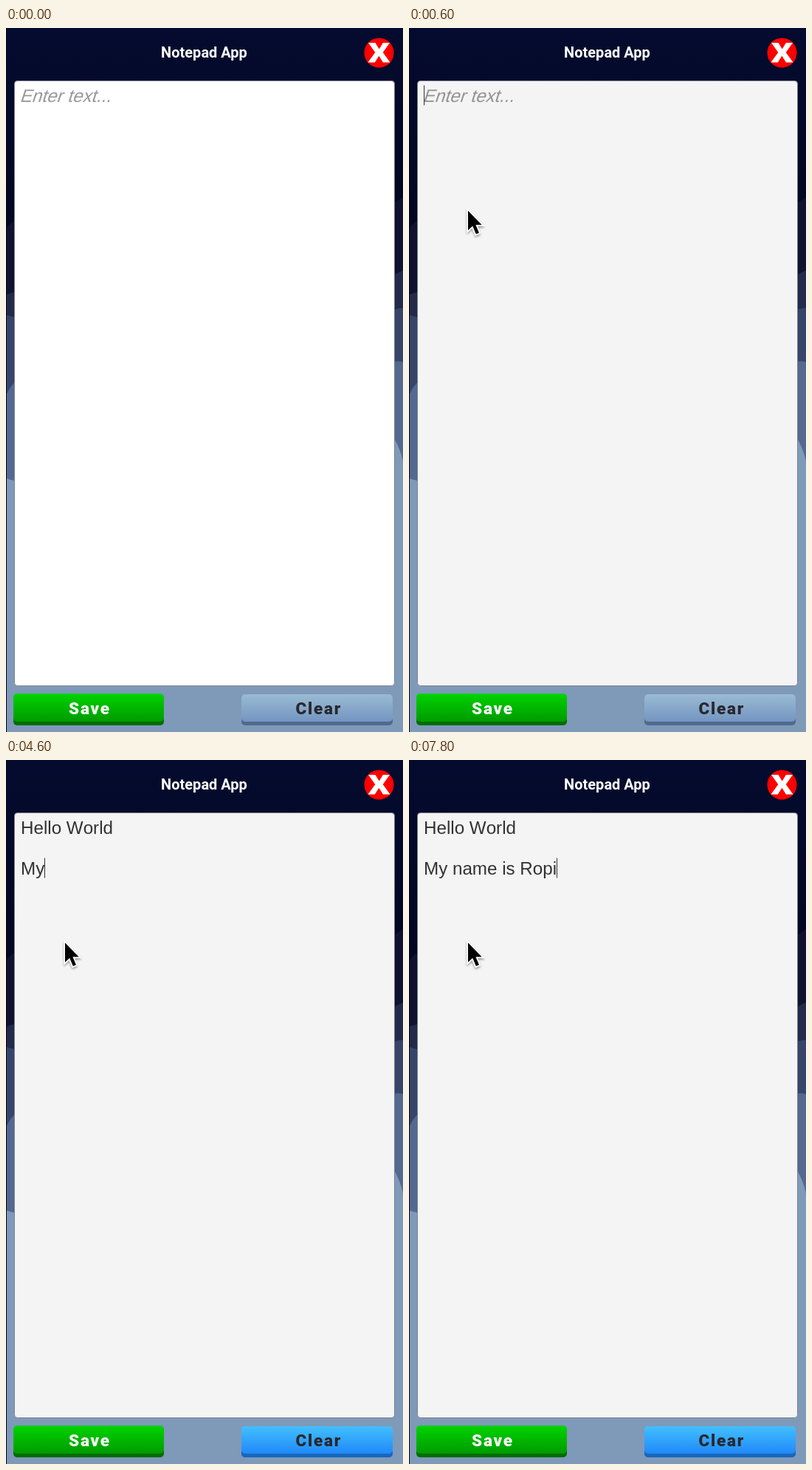
Write an HTML page that moves like this. It is 538 px wide and 952 px high and loops after 8 s.

```html
<!DOCTYPE html>
<html lang="en">
<head>
<meta charset="utf-8">
<title>Notepad App</title>
<style>
  html, body { margin: 0; width: 100%; height: 100%; overflow: hidden; background: #040a2c; }
  svg { display: block; width: 538px; height: 952px; }
  .title { font: 700 20px Roboto, sans-serif; fill: #fff; }
  .label { font: 900 22.5px Roboto, sans-serif; letter-spacing: 1.8px; }
  .note { font: 24.2px "Liberation Sans", Arial, sans-serif; font-kerning: none; fill: #323232; white-space: pre; }
</style>
</head>
<body>
<svg viewBox="0 0 538 952">
  <defs>
    <linearGradient id="sky" x2="0" y2="1">
      <stop stop-color="#040b2e"/><stop offset="1" stop-color="#020620"/>
    </linearGradient>
    <linearGradient id="green" x2="0" y2="1">
      <stop stop-color="#00d400"/><stop offset="1" stop-color="#009a00"/>
    </linearGradient>
    <linearGradient id="blue" x2="0" y2="1">
      <stop stop-color="#42c0ff"/><stop offset="1" stop-color="#2089f8"/>
    </linearGradient>
    <linearGradient id="muted" x2="0" y2="1">
      <stop stop-color="#9abbd4"/><stop offset="1" stop-color="#7495c0"/>
    </linearGradient>
    <filter id="shadow" x="-50%" y="-50%" width="200%" height="200%">
      <feDropShadow dx="0" dy="2" stdDeviation="1.5" flood-opacity=".4"/>
    </filter>
  </defs>

  <rect width="538" height="300" fill="url(#sky)"/>
  <g id="clouds"></g>
  <rect width="1" height="952" fill="#03071c"/>

  <text class="title" x="268.5" y="40" text-anchor="middle">Notepad App</text>
  <circle cx="505.5" cy="33.5" r="20" fill="#f00"/>
  <path fill="#fff" d="M491 20h9.5l5.2 8.4 5.2-8.4h9.1l-9.2 13 9.7 13.5h-9.6l-5.5-8.8-5.6 8.8h-9.3l9.8-13.5z"/>

  <rect id="field" x="11.5" y="71.5" width="515" height="818" rx="4" stroke="#7e8490"/>
  <text id="hint" class="note" fill-opacity=".5" transform="translate(18.2 100) skewX(-18)">Enter text...</text>
  <text id="line0" class="note" x="20" y="100"></text>
  <text id="line1" class="note" x="20" y="155"></text>
  <rect id="caret" width="1" height="27" fill="#323232"/>

  <rect x="10" y="902" width="204" height="41" rx="5" fill="#006c00"/>
  <rect x="10" y="900" width="204" height="38" rx="5" fill="url(#green)"/>
  <text class="label" x="85" y="928" fill="#fff">Save</text>

  <rect x="319" y="903" width="205" height="40" rx="5" fill="#50698f"/>
  <rect x="319" y="901" width="205" height="37" rx="5" fill="url(#muted)"/>
  <g id="active">
    <rect x="319" y="903" width="205" height="40" rx="5" fill="#1767bd"/>
    <rect x="319" y="901" width="205" height="37" rx="5" fill="url(#blue)"/>
  </g>
  <text class="label" x="392.5" y="928" fill="#28282e">Clear</text>

  <path id="pointer" d="M0 0V26.5L6.2 20.8 10.8 31.8 15 30 10.4 19.3H18.7Z" stroke="#fff" stroke-width="3.2" paint-order="stroke" filter="url(#shadow)"/>
</svg>
<script>
const LOOP = 8000, STEP = 100;
const $ = id => document.getElementById(id);
const clamp = v => Math.max(0, Math.min(1, v));

// Cloud layers: color, edge heights at x = 0 and 12, then at 526 and 538
const clouds = [
  ['#101230', 272, 260, 237, 229],
  ['#242a49', 361, 357, 334, 328],
  ['#38456a', 388, 391, 381, 379],
  ['#556890', 497, 479, 451, 452],
  ['#7f99b9', 609, 612, 555, 586]
];
$('clouds').innerHTML = clouds.map(([color, a, b, c, d]) =>
  `<path fill="${color}" d="M0 ${a}Q5 ${(a + 2 * b) / 3} 12 ${b}L526 ${c}Q534 ${(c + d) / 2 - 2} 538 ${d}V952H0Z"/>`).join('');

const message = 'Hello World\n\nMy name is Ropi';
// Key press times in tenths of a second, one per character
const keys = [11, 15, 18, 21, 24, 26, 28, 29, 30, 32, 33, 35, 37,
  42, 45, 48, 50, 51, 52, 54, 55, 56, 57, 58, 60, 62, 68, 72];
const shades = [255, 255, 250, 244, 227, 208, 244];

function drawText(t) {
  const typed = message.slice(0, keys.filter(k => k * 100 <= t).length);
  const lines = typed.split('\n');
  const last = lines.length - 1;
  const row = $(last ? 'line1' : 'line0');
  $('line0').textContent = lines[0];
  $('line1').textContent = lines[2] || '';
  $('hint').style.display = typed ? 'none' : '';
  const width = lines[last] ? row.getComputedTextLength() : 0;
  $('caret').setAttribute('x', Math.round(20 + width));
  $('caret').setAttribute('y', 77.5 + last * 27.5);
  $('caret').style.display = t >= 400 && (t < 1000 || t >= 1100) ? '' : 'none';
}

function draw(now) {
  const t = Math.floor(now % LOOP / STEP) * STEP;
  const shade = shades[Math.min(t / STEP, shades.length - 1)];
  $('field').setAttribute('fill', `rgb(${shade},${shade},${shade})`);

  const away = 1 - clamp(t / 300);
  $('pointer').setAttribute('transform', `translate(${80 - 100 * away * away} ${247 + 50 * away * away})`);
  $('pointer').style.display = t ? '' : 'none';

  $('active').setAttribute('opacity', clamp((t - 1000) / 200));
  drawText(t);
}

const start = performance.now();
function tick() {
  draw(performance.now() - start);
  requestAnimationFrame(tick);
}
tick();
</script>
</body>
</html>
```
